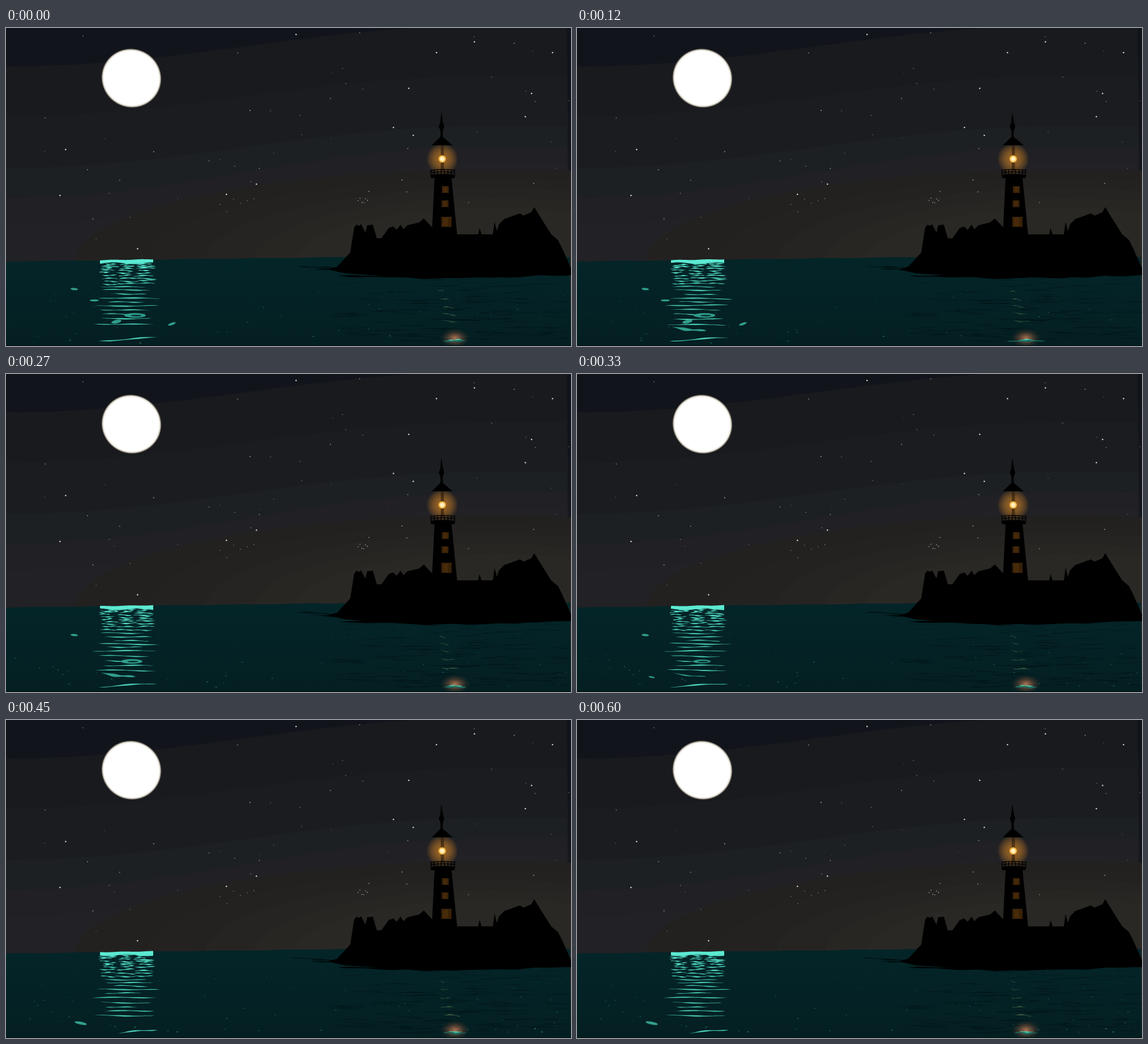
An HTML page with a canvas for the animation above (0.63 s loop, 998 px wide and 561 px high).

```html
<!DOCTYPE html>
<html lang="en">
<head>
<meta charset="utf-8">
<title>Lighthouse at night</title>
<style>
html, body { margin: 0; width: 100%; height: 100%; overflow: hidden; background: #042023; }
canvas { display: block; width: 998px; height: 561px; }
</style>
</head>
<body>
<canvas id="stage" width="998" height="561"></canvas>
<script>
const W = 998, H = 561, LOOP = 630, STEP = 30;
const ctx = document.getElementById('stage').getContext('2d');
const { sin, cos, PI, floor, min, max, pow } = Math;

// Repeatable random number in 0..1 for two keys
function hash(a, b = 0) {
  const v = sin(a * 127.1 + b * 311.7 + 4.3) * 43758.5453;
  return v - floor(v);
}

function layer(paint) {
  const c = document.createElement('canvas');
  c.width = W;
  c.height = H;
  paint(c.getContext('2d'));
  return c;
}

function blob(g, color, x, y, rx, ry = rx, turn = 0) {
  g.fillStyle = color;
  g.beginPath();
  g.ellipse(x, y, rx, ry, turn, 0, 2 * PI);
  g.fill();
}

// Wide sky band that eases from one height on the left to another on the right
function skyBand(g, color, left, right) {
  g.fillStyle = color;
  g.beginPath();
  g.moveTo(0, 420);
  for (let x = 0; x <= W; x += 10) {
    const u = 0.5 - 0.5 * cos(PI * min(1, x / 850));
    g.lineTo(x, left + (right - left) * u);
  }
  g.lineTo(W, 420);
  g.fill();
}

function drawStars(g) {
  const bright = [[512, 11], [760, 43], [965, 43], [827, 24], [928, 115], [917, 156], [684, 175],
    [719, 189], [711, 106], [95, 295], [105, 214], [389, 293], [232, 389], [442, 275]];
  for (const [x, y] of bright) blob(g, '#e6e6e2', x + 0.4, y + 0.4, 1.2);

  for (let i = 0; i < 52; i++) {
    const light = 75 + 95 * hash(i, 3);
    blob(g, `rgb(${light},${light},${light})`, hash(i, 1) * W, hash(i, 2) * 400, 0.6 + light / 500);
  }
  // Two small clusters
  for (let i = 0; i < 6; i++) {
    blob(g, '#b4b4b0', 622 + i * 3.3, 300 + 9 * hash(i, 7), 0.8);
    blob(g, '#808080', 378 + i * 12, 299 + 26 * hash(i, 8), 0.8);
  }
}

const sky = layer(g => {
  g.fillStyle = '#11141b';
  g.fillRect(0, 0, W, H);
  skyBand(g, '#191a1e', 68, -4);
  skyBand(g, '#1b1c1f', 156, 85);
  skyBand(g, '#1c2023', 247, 173);
  skyBand(g, '#212024', 300, 209);
  skyBand(g, '#222125', 347, 238);

  // Warm haze around the island
  for (let i = 0; i < 5; i++)
    blob(g, `rgb(${34 + 2 * i},${32.5 + 1.8 * i},${32 + i})`, 860, 412, 738 * pow(0.83, i), 163 - 17 * i);

  drawStars(g);

  g.translate(221.5, 88.5);
  g.rotate(0.5);
  g.scale(1, 0.97);
  const edge = g.createRadialGradient(0, 0, 48.5, 0, 0, 54);
  edge.addColorStop(0, '#fff');
  edge.addColorStop(0.4, '#e6e2d8');
  edge.addColorStop(0.7, '#807b70');
  edge.addColorStop(1, 'rgba(40,38,35,0)');
  blob(g, edge, 0, 0, 54);
});

const sea = layer(g => {
  const deep = g.createLinearGradient(0, 404, 0, H);
  deep.addColorStop(0, '#042528');
  deep.addColorStop(1, '#041f22');
  g.fillStyle = deep;
  g.fillRect(0, 400, W, 161);
});

function drawLamp(g) {
  for (let r = 27; r > 5; r -= 2.6) blob(g, 'rgba(225,145,40,.105)', 770.5, 231, r);
  g.fillStyle = 'rgba(40,25,10,.6)';
  g.fillRect(768, 207, 5.5, 45);
  blob(g, '#f5b848', 770.5, 231, 6.5);
  blob(g, '#fff0c0', 770.5, 231, 4);
}

function drawTower(g) {
  g.fillStyle = '#000';
  g.fill(new Path2D('M769 148L772 167L774 174L771.5 182V192L789 207H752L767.5 192V182L764.5 174L767 167Z'));
  g.fill(new Path2D('M750 259Q771 256 793 259L792 265H787L797 366H752L757 265H751Z'));

  g.strokeStyle = '#050302';
  g.lineWidth = 1.4;
  g.stroke(new Path2D('M750 251Q771 248 793 251M751 255Q771 252 792 255'));
  for (let x = 750.5; x < 794; x += 6) g.strokeRect(x, 250, 0.1, 11);

  for (let i = 0; i < 3; i++) {
    const w = i < 2 ? 12 : 18, x = 770 - i / 2, y = 279 + 25 * i + (i > 1 ? 4 : 0);
    g.fillStyle = '#382108';
    g.fillRect(x, y, w, w);
    g.fillStyle = '#462a0a';
    g.fillRect(x + 3, y + 1.5, w / 2, w - 3);
  }
}

const island = layer(g => {
  drawLamp(g);
  g.fillStyle = '#000';
  g.fill(new Path2D('M568 426L585 421L608 396L615 352L619 347L624 349L627 346L635 361L638 348L648 347L655 371' +
    'H663L676 353L684 350L690 356L697 347L702 355L709 348L730 343L738 336L753 352V364H834L836.5 353L840 364' +
    'H860L863 342L867 358L871 346L880 337L908 327L914 331L928 325L933 316L946 337L963 364L975 374L983 390' +
    'L998 424V436L940 436L905 440L800 440L740 443L680 438L600 433Z'));
  drawTower(g);
});

// Tapered wavy streak from (x1, y) to (x2, y + tilt)
function streak(color, x1, x2, y, w, tilt, ph, wave = 0.6) {
  const n = 14, upper = [], lower = [];
  for (let i = 0; i <= n; i++) {
    const u = i / n, x = x1 + (x2 - x1) * u;
    const cy = y + tilt * u + wave * sin(u * 6 + ph);
    const half = w / 2 * pow(sin(PI * u), 0.6) * (0.7 + 0.3 * sin(u * 11 + ph * 2));
    upper.push([x, cy - half]);
    lower.unshift([x, cy + half]);
  }
  ctx.fillStyle = color;
  ctx.beginPath();
  for (const p of [...upper, ...lower]) ctx.lineTo(...p);
  ctx.fill();
}

function moonPath(t) {
  const ph = t / 110;
  ctx.fillStyle = '#5cead2';
  ctx.beginPath();
  for (let x = 166; x <= 260; x += 2) ctx.lineTo(x, 409.5 - (x - 166) / 60 + 0.4 * sin(x / 8 + ph));
  for (let x = 260; x >= 166; x -= 2) ctx.lineTo(x, 415 + 1.5 * sin(x / 11 + ph));
  ctx.fill();

  // Rows of light spread out and break up towards the viewer
  let y = 416;
  for (let r = 0; y < 530; r++) {
    const depth = (y - 416) / 114;
    const parts = depth < 0.35 ? 3 : 1;
    for (let k = 0; k < parts; k++) {
      const slot = 96 / parts;
      const len = slot * (0.6 + 0.6 * hash(r, k + 5));
      const x = 165 + slot * k + (slot - len) * hash(r, k) + 3 * sin(ph * 0.7 + r);
      streak(depth < 0.25 ? '#54dfc7' : '#49cbb4', x, x + len, y + sin(ph + r + k), 1.7 + hash(r, k + 9),
        3 * hash(k, r) - 1.5, ph + r * 2 + k);
    }
    y += 2.6 + 0.33 * r;
  }
  streak('#49cbb4', 163 + 80 * max(0, t - 380) / 160, 268, 552, 2.8, -6, ph * 0.5, 1);
}

// 1 inside a span of time, easing at both ends
const life = (t, from, to) => max(0, min(1, (t - from) / 40 + 0.5, (to - t) / 40 + 0.5));

function pools(t) {
  const teal = '#319e8c';
  const early = life(t, -99, 200), middle = life(t, 70, 325), late = life(t, 330, 999);
  const ring = 1 - 0.4 * life(t, 330, 420);
  const stay = life(t, -99, 420);
  const drift = 228 - t / 45;
  blob(ctx, teal, 120.5, 460.5, 6.5 * stay, 2 * stay, 0.1);
  blob(ctx, teal, 156, 480.5, 8 * early, 1.7 * early);
  blob(ctx, teal, 293, 522, 7 * early, 2 * early, -0.35);
  blob(ctx, teal, 195, 518, 9 * early, 3 * early, -0.2);
  blob(ctx, teal, drift, 507, 19 * ring * stay, 4 * ring * stay);
  blob(ctx, '#08393a', drift + 2, 507.3, 10 * stay, 1.6 * stay);
  streak(teal, 168, 229, 528, 6 * middle, 7, 5.2, 1);
  blob(ctx, teal, 132, 534.8, 11 * late, 2.6 * late, 0.2);
}

function ripples(t) {
  const ph = t / 120;
  for (let i = 0; i < 100; i++) {
    const near = pow(hash(i, 1), 1.2), len = 24 + 28 * hash(i, 3) + near * 32;
    const x = 595 + hash(i, 2) * 400 + 3 * sin(ph + i);
    streak(`rgba(1,18,21,${0.25 + 0.35 * hash(i, 4)})`, x - len / 2, x + len / 2, 440 + near * 112,
      1.4 + near * 2.2, 3 * hash(i, 5) - 1.5, ph + i);
  }
}

function glints(t) {
  for (let i = 0; i < 190; i++) {
    const beat = sin(t / 130 + hash(i, 31) * 2 * PI);
    if (beat < 0.35) continue;
    const near = hash(i, 32), size = 0.4 + near * 0.7;
    const x = hash(i, 33) * W + 2 * sin(t / 150 + i), y = 440 + near * 116;
    blob(ctx, `rgba(62,180,155,${(beat - 0.2) * (0.25 + 0.5 * hash(i, 35))})`,
      x, y, size * 1.6, size * 0.8, hash(i, 36) - 0.5);
  }
}

function lampPath(t) {
  const ph = t / 110;
  const glow = ctx.createRadialGradient(0, 0, 1, 0, 0, 27);
  glow.addColorStop(0, 'rgba(205,130,90,.8)');
  glow.addColorStop(0.4, 'rgba(140,90,65,.55)');
  glow.addColorStop(1, 'rgba(50,45,40,0)');
  ctx.save();
  ctx.translate(793, 547);
  ctx.scale(1, 0.65);
  blob(ctx, glow, 0, 0, 27);
  ctx.restore();

  const spread = 20 + 14 * life(t, 60, 200);
  streak('#1d6a5e', 793 - spread, 793 + spread, 552, 5, 0, ph);
  streak('#58c8a8', 781, 806, 550, 2.6, 0, ph);
  // Broken greenish glimmer below the tower
  for (let i = 0; i < 5; i++) {
    const x = 768 + i * 5 + 3 * sin(ph / 2 + i), half = 6 + 2.5 * i;
    streak(`rgba(100,135,82,${0.45 + 0.1 * sin(ph + i)})`, x - half, x + half, 462 + 14 * i + 2 * sin(ph + i),
      1.6 + i * 0.2, 2, ph + i, 1);
  }
}

function clipSea(t) {
  ctx.beginPath();
  ctx.moveTo(0, H);
  for (let x = 0; x <= W; x += 6)
    ctx.lineTo(x, max(404, 412 - x / 75) + 0.4 * sin(x / 19 + t / 120));
  ctx.lineTo(W, H);
  ctx.clip();
}

function shore(t) {
  const ph = t / 120;
  streak('#010d0f', 513 - t / 50, 590, 420, 2.6, 4, ph);
  streak('#010d0f', 535, 610, 425, 3, 3, ph + 2);
  for (let i = 0; i < 3; i++)
    streak('#000', 585 + 130 * i, 740 + 130 * i, 437 + 2 * sin(i * 2), 5, 2 - i, ph + i);
}

function draw(t) {
  ctx.drawImage(sky, 0, 0);
  ctx.save();
  clipSea(t);
  ctx.drawImage(sea, 0, 0);
  ripples(t);
  glints(t);
  lampPath(t);
  shore(t);
  ctx.restore();
  moonPath(t);
  pools(t);
  ctx.drawImage(island, 0, 0);
  ctx.fillStyle = '#02090b';
  ctx.fillRect(0, 560, W, 1);
}

// The water slips back shortly before the loop restarts
function pose(ms) {
  const t = floor(ms % LOOP / STEP) * STEP;
  return t <= 540 ? t : t === 570 ? 495 : 450;
}

let shown = -1;
const start = performance.now();
function tick() {
  const t = pose(performance.now() - start);
  if (t !== shown) draw(shown = t);
  requestAnimationFrame(tick);
}
tick();
</script>
</body>
</html>
```
